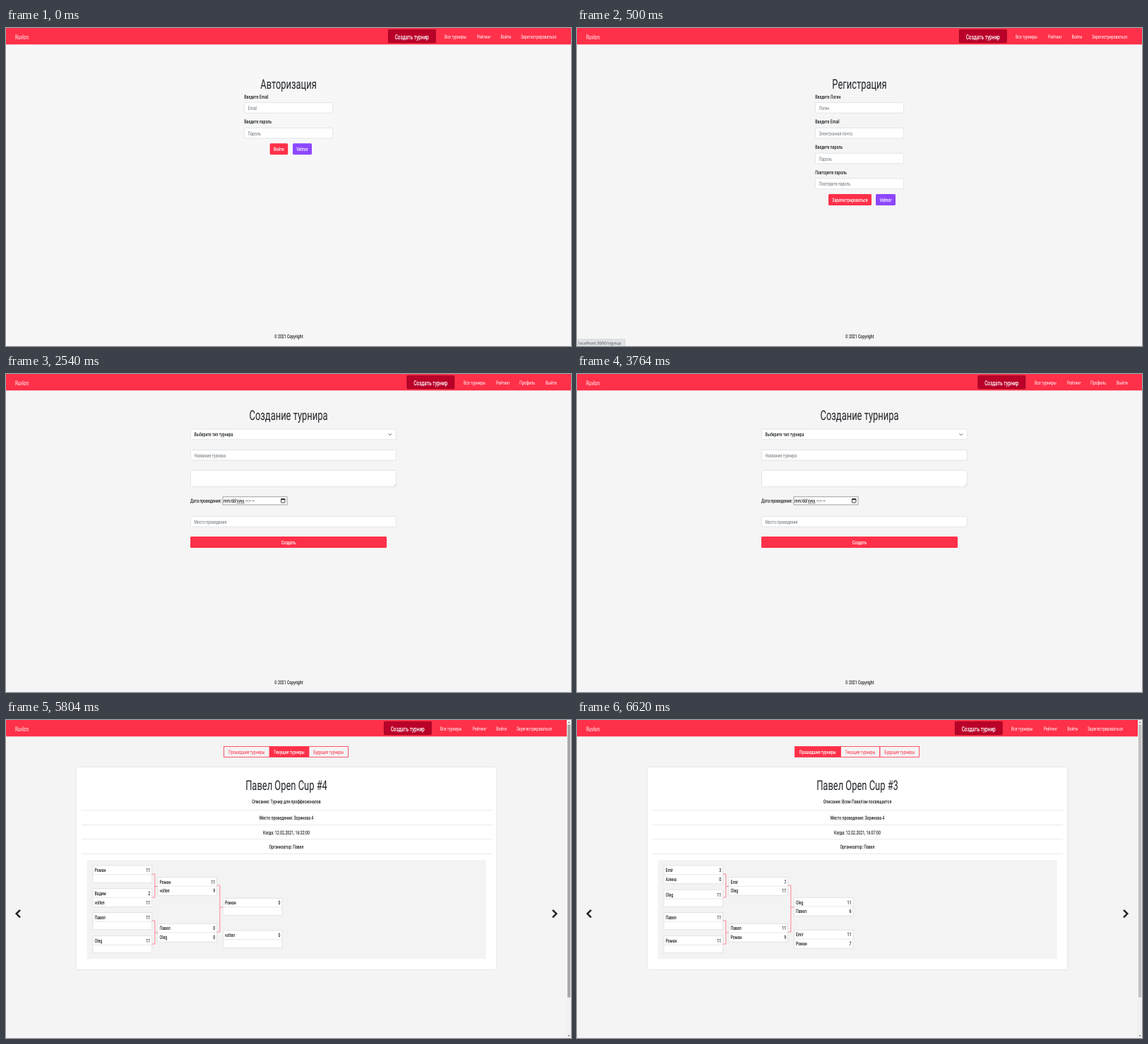
Animation, 800 px wide and 450 px high, one loop 8 s. Source, as an HTML page:

```html
<!DOCTYPE html>
<html lang="ru">
<head>
<meta charset="utf-8">
<title>Турниры</title>
<style>
html, body { margin: 0; width: 100%; height: 100%; overflow: hidden; background: #f4f4f4; }
svg { display: block; width: 100vw; height: 100vh; }
text { font-family: Roboto, "Liberation Sans", sans-serif; font-weight: 500; text-rendering: geometricPrecision; white-space: pre; }
.plain { font-family: "Open Sans", sans-serif; font-weight: 400; }
</style>
</head>
<body>
<svg id="stage" viewBox="0 0 800 450"></svg>
<script>
const RED = '#ff3049', DARK = '#212529', GREY = '#6c757d', LINE = '#dcdfe3';
const CONDENSE = 0.68; // one narrow look for the whole interface font
const BODY = 7.6;

const rect = (x, y, w, h, fill, stroke = 'none', r = 0) =>
  `<rect x="${x}" y="${y}" width="${w}" height="${h}" rx="${r}" fill="${fill}" stroke="${stroke}" stroke-width=".8"/>`;
const path = (d, stroke, width = 0.8) =>
  `<path d="${d}" fill="none" stroke="${stroke}" stroke-width="${width}"/>`;

// y is the vertical middle of the capitals
function text(x, y, str, { size = BODY, fill = DARK, anchor = 'start', weight = 500 } = {}) {
  return `<text transform="translate(${x} ${y + size * 0.355}) scale(${CONDENSE} 1)" font-size="${size}"
    fill="${fill}" text-anchor="${anchor}" style="font-weight:${weight}">${str}</text>`;
}
const center = (x, y, str, opt) => text(x, y, str, { anchor: 'middle', ...opt });
const heading = (x, y, str) => center(x, y, str, { size: 19, weight: 400 });

function header(buttonX, links, width = 800) {
  return rect(0, 0, width, 23.3, RED) +
    text(13, 12.3, 'Ruvlon', { size: 9.2, fill: '#fff', weight: 400 }) +
    rect(buttonX + 0.4, 2.4, 66.8, 18.4, '#ba0029', '#8c001d', 0.8) +
    center(buttonX + 33.7, 12.3, 'Создать турнир', { size: 9.5, fill: '#fff' }) +
    links.map(([x, str]) => text(x, 12, str, { fill: '#fff', weight: 400 })).join('');
}
const guestLinks = dx => [[621, 'Все турниры'], [667, 'Рейтинг'], [700.5, 'Войти'], [729, 'Зарегистрироваться']]
  .map(([x, str]) => [x + dx, str]);
const footer = () => center(400, 436.7, '© 2021 Copyright');

const input = (x, y, w, hint = '', h = 15.5) =>
  rect(x + 0.4, y + 0.4, w - 0.8, h - 0.8, '#fff', LINE, 1.2) +
  text(x + 5.6, y + 8.1, hint, { fill: GREY, weight: 400 });
const button = (x, y, w, str, fill) =>
  rect(x, y, w, 16, fill, 'none', 1.6) + center(x + w / 2, y + 8.1, str, { fill: '#fff' });

function authPage(title, fields, buttons) {
  const bottom = 163.2 + (fields.length - 2) * 35.9;
  return header(541, guestLinks(0)) + heading(400, 79.2, title) +
    fields.map(([label, hint], i) => {
      const y = 97 + i * 35.8;
      return text(337.2, y, label) + input(337, y + 8.2, 126, hint);
    }).join('') +
    buttons.map(([x, w, str, fill]) => button(x, bottom, w, str, fill)).join('') + footer();
}

function createPage() {
  return header(567.5, [[648, 'Все турниры'], [694, 'Рейтинг'], [727, 'Профиль'], [764, 'Выйти']]) +
    heading(400, 58.2, 'Создание турнира') +
    input(261, 77.7, 291.7) + text(266.5, 85.7, 'Выберите тип турнира') +
    path('M541.6 84.4l2.2 2.2 2.2-2.2', DARK) +
    input(261, 107, 291.7, 'Название турнира') +
    input(261, 136, 291.7, '', 24) + path('M548.6 158.6l3-3M550.4 158.6l1.2-1.2', '#888', 0.4) +
    text(261, 179.6, 'Дата проведения:') +
    rect(307, 173.8, 91, 11.2, '#fff', '#8a8a8a') +
    text(308, 179.6, 'mm/dd/yyyy, --:-- --') +
    rect(389.5, 176.8, 5.4, 5.2, 'none', '#111', 0.5) + path('M389.2 177.3h6', '#111', 1.4) +
    input(261, 201.2, 291.7, 'Место проведения') +
    button(261, 230, 278, 'Создать', RED) + footer();
}

const TABS = [[308.4, 64.8, 'Прошедшие турниры'], [373.2, 55.6, 'Текущие турниры'], [428.8, 55.8, 'Будущие турниры']];

function match([x, y, a, scoreA, b = '', scoreB = '']) {
  const h = b ? 25.8 : 24.2, mid = y + 12.7;
  const row = (cy, name, score) =>
    text(x + 2.6, cy, name) + text(x + 81.2, cy, score, { anchor: 'end' });
  return rect(x, y, 83.6, h, '#fff', '#dedede') + path(`M${x} ${mid}h83.6`, '#dedede', 0.7) +
    row(y + 6.6, a, scoreA) + row(y + 19.4, b, scoreB);
}
const bracket = (x, top, bottom, mid, end) =>
  path(`M${x} ${top}h3.8V${bottom}h-3.8M${x + 3.8} ${mid}H${end}`, '#ff6b7c');

function tournamentPage(active, thumb, title, about, when, matches) {
  const rows = [[115, 'Описание: ' + about], [138.6, 'Место проведения: Зоринова 4'],
    [159, 'Когда: ' + when], [179.6, 'Организатор: Павел']];
  return header(535, guestLinks(-6.2), 794) +
    TABS.map(([x, w, str], i) => rect(x, 37.4, w, 15, i === active ? RED : 'none', RED) +
      center(x + w / 2, 45, str, { fill: i === active ? '#fff' : RED, weight: i === active ? 500 : 400 })).join('') +
    rect(99.4, 66.6, 595, 286.8, '#fff', '#e2e2e2', 1) +
    heading(397, 92, title) +
    rows.map(([y, str]) => center(397, y, str)).join('') +
    [127.7, 148.5, 168.7, 189.4].map(y => path(`M107 ${y}H688`, '#e4e4e4')).join('') +
    rect(114.5, 198, 565, 140.2, '#f3f3f3') +
    bracket(207, 218, 251, 235.5, 215) + bracket(207, 284, 317, 301, 215) +
    bracket(299, 234, 300, 265, 307) +
    matches.map(match).join('') +
    path('M20 268.8l-5.3 5.3 5.3 5.3', DARK, 2.5) + path('M774 268.8l5.3 5.3-5.3 5.3', DARK, 2.5) +
    rect(794, 0, 6, 450, '#f1f1f1') + rect(795, 6.5, 4.2, 386, thumb) +
    '<path d="M795.6 4l1.5-1.8 1.5 1.8zM795.6 446l1.5 1.8 1.5-1.8z" fill="#606060"/>';
}

const LOGIN = authPage('Авторизация',
  [['Введите Email', 'Email'], ['Введите пароль', 'Пароль']],
  [[373.6, 25.6, 'Войти', RED], [406, 27, 'Velmor', '#8d47ff']]);

const SIGNUP = authPage('Регистрация',
  [['Введите Логин', 'Логин'], ['Введите Email', 'Электронная почта'],
    ['Введите пароль', 'Пароль'], ['Повторите пароль', 'Повторите пароль']],
  [[356, 61, 'Зарегистрироваться', RED], [423, 28, 'Velmor', '#8d47ff']]) +
  rect(-1, 440.4, 69, 11, '#dee1e6', '#cfd2d6', 1) +
  '<text class="plain" x="2" y="447.5" font-size="5.9" fill="#4a4d51">localhost:3000/signup</text>';

const CURRENT = tournamentPage(1, '#a8a8a8', 'Павел Open Cup #4', 'Турнир для проффесионалов', '12.02.2021, 16:32:00', [
  [123, 206, 'Роман', 11], [123, 238.6, 'Вадим', 2, 'volten', 11],
  [123, 272.6, 'Павел', 11], [123, 305.5, 'Oleg', 11],
  [215, 222.4, 'Роман', 11, 'volten', 9], [215, 288.2, 'Павел', 0, 'Oleg', 0],
  [307.3, 252.2, 'Роман', 0], [307.3, 298, 'volten', 0]]);

const PAST = tournamentPage(0, '#c1c1c1', 'Павел Open Cup #3', 'Всем Павел\'ам посвящается', '12.02.2021, 16:07:00', [
  [123, 206, 'Emir', 3, 'Алина', 0], [123, 240.3, 'Oleg', 11],
  [123, 272.6, 'Павел', 11], [123, 305.5, 'Роман', 11],
  [215, 222.4, 'Emir', 7, 'Oleg', 11], [215, 288.2, 'Павел', 11, 'Роман', 9],
  [307.3, 251.3, 'Oleg', 11, 'Павел', 6], [307.3, 297.2, 'Emir', 11, 'Роман', 7]]);

// [start in ms, background, content]
const SCENES = [
  [0, '#f7f7f7', LOGIN], [500, '#f5f5f5', SIGNUP], [2540, '#f5f5f5', createPage()],
  [4580, '#f4f4f4', CURRENT], [6620, '#f4f4f4', PAST]];

const stage = document.getElementById('stage');
stage.innerHTML = SCENES.map(([, bg, body]) => `<g>${rect(0, 0, 800, 450, bg)}${body}</g>`).join('');
const groups = [...stage.children];
const start = performance.now();

function draw(now) {
  const t = Math.max(0, now - start) % 8000;
  const current = SCENES.findLastIndex(([from]) => t >= from);
  groups.forEach((g, i) => g.setAttribute('display', i === current ? 'inline' : 'none'));
  requestAnimationFrame(draw);
}
draw(start);
</script>
</body>
</html>
```
